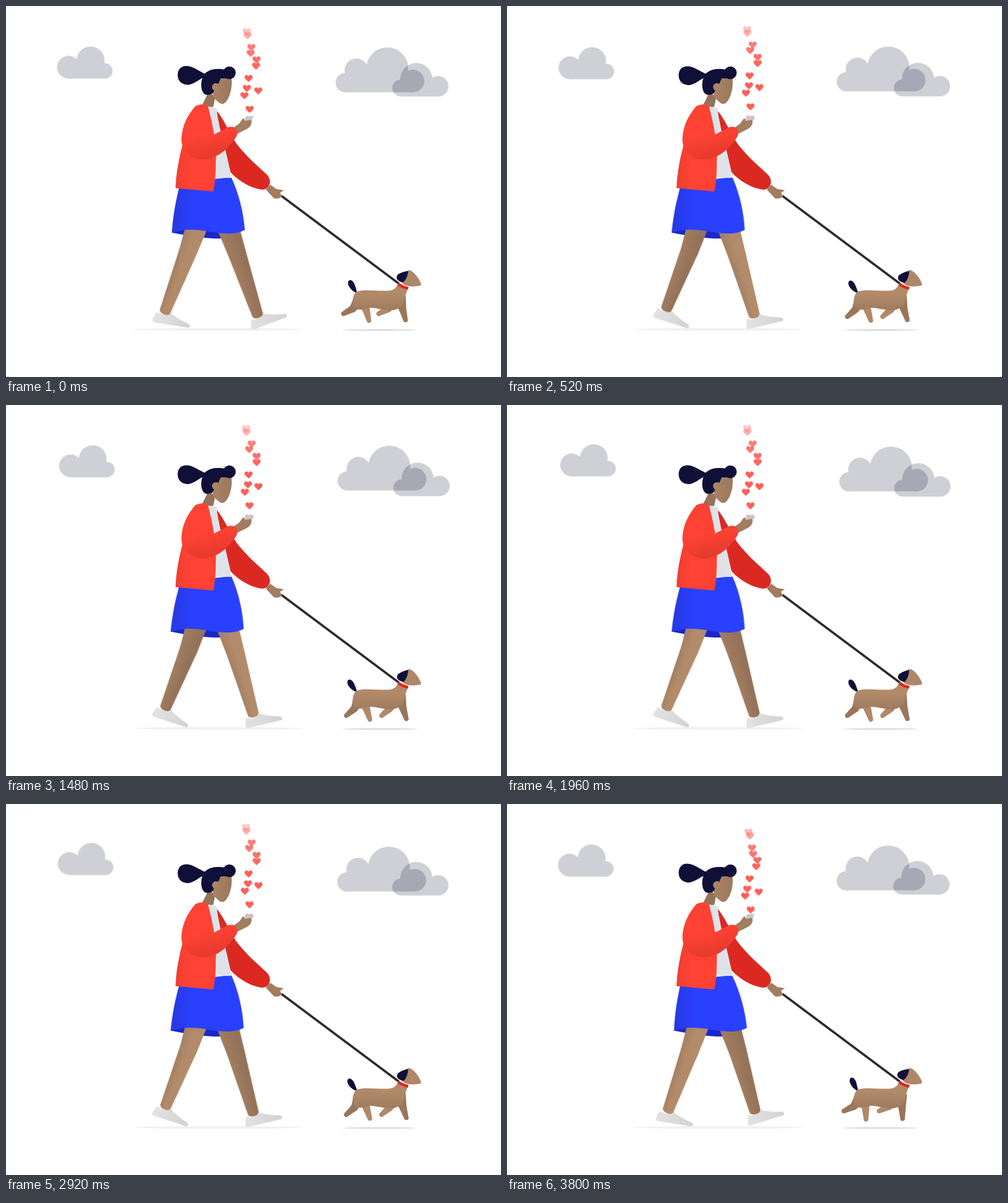
Animation of 800x600 px, one loop 3840 ms. Source, as an HTML page without scripts:

```html
<!DOCTYPE html>
<html lang="en">
<head>
<meta charset="utf-8">
<title>Walking the dog</title>
<style>
html, body { margin: 0; width: 100%; height: 100%; overflow: hidden; background: #fff; }
svg { display: block; width: 800px; height: 600px; }

/* Clouds drift on slow ellipses: x and y swing independently */
.cloud {
  fill: #0f0f36; opacity: .2;
  animation: drift 1920ms var(--dx) cubic-bezier(.37,0,.63,1) infinite alternate,
             float 1920ms var(--dy) cubic-bezier(.37,0,.63,1) infinite alternate;
}
@keyframes drift { from { translate: calc(var(--x) * -1) } to { translate: var(--x) } }
@keyframes float { from { transform: translateY(calc(var(--y) * -1)) } to { transform: translateY(var(--y)) } }

/* Each heart covers one stretch of its stream per step, then the next takes over */
.hearts use {
  --a: 1; --b: 1;
  fill: #ff5f57; offset-rotate: 0deg;
  animation: rise 480ms -440ms linear infinite, fade 480ms -440ms linear infinite;
}
.hearts .last { animation-name: rise, vanish; }
.hearts .late { animation-name: rise, vanish-late; }
@keyframes rise { from { offset-distance: 0% } to { offset-distance: 100% } }
@keyframes fade { from { opacity: var(--a) } to { opacity: var(--b) } }
@keyframes vanish { from { opacity: var(--a) } 24%, to { opacity: 0 } }
@keyframes vanish-late { from { opacity: var(--a) } 62%, to { opacity: 0 } }

/* Walk: 0% leg fully back, 50% fully forward */
.thigh, .shin, .foot { animation: 960ms var(--delay) linear infinite; }
.near { --delay: 0ms; fill: url(#nearSkin); }
.far { --delay: -480ms; fill: url(#farSkin); }
.thigh { animation-name: thigh; }
.shin { translate: 0 112px; animation-name: shin; }
.foot { translate: 0 104px; animation-name: foot; fill: url(#shoeGrey); }
@keyframes thigh {
  0%, 100% { translate: 330px 293px; rotate: 19deg }
  4.17% { translate: 330px 288px; rotate: 18deg }
  12.5% { translate: 331px 292px; rotate: 10deg }
  25% { translate: 334px 293px; rotate: -12deg }
  37.5% { translate: 337px 293px; rotate: -26deg }
  45.83% { translate: 338px 292px; rotate: -18deg }
  50% { translate: 338px 297px; rotate: -19deg }
  54.17% { translate: 338px 295px; rotate: -17.3deg }
  62.5% { translate: 336px 295px; rotate: -22deg }
  75% { translate: 334px 293px; rotate: -9deg }
  87.5% { translate: 331px 293px; rotate: 3.5deg }
  95.83% { translate: 330px 293px; rotate: 18deg }
}
@keyframes shin {
  0%, 100% { rotate: 2deg }
  4.17% { rotate: 3.5deg }
  12.5% { rotate: 30deg }
  25% { rotate: 52deg }
  37.5% { rotate: 34deg }
  45.83% { rotate: 2deg }
  50% { rotate: .5deg }
  54.17% { rotate: 1deg }
  62.5% { rotate: 24deg }
  75% { rotate: 22deg }
  87.5% { rotate: 16deg }
  95.83% { rotate: 2deg }
}
@keyframes foot {
  0%, 100% { rotate: -12deg }
  4.17% { rotate: -4deg }
  12.5% { rotate: 0deg }
  25% { rotate: -8deg }
  37.5% { rotate: -12deg }
  45.83% { rotate: -1deg }
  50% { rotate: -2.5deg }
  54.17% { rotate: 2.5deg }
  62.5% { rotate: -2deg }
  75% { rotate: -13deg }
  87.5% { rotate: -19.5deg }
  95.83% { rotate: -11deg }
}

/* Secondary motion, one swing back and forth per step */
.skirt, .pony, .tail, .ear, .upper, .lower {
  animation: 240ms -120ms cubic-bezier(.37,0,.63,1) infinite alternate;
}
.skirt { transform-origin: 320px 290px; animation-name: sway; }
@keyframes sway { from { transform: skewX(2.8deg) } to { transform: skewX(-2.8deg) } }
.pony { transform-origin: 322px 112px; animation-name: swing; --from: 2deg; --to: -2deg; }
.tail { transform-origin: 567px 463px; animation-name: swing; --from: 6deg; --to: -10deg; }
.ear { transform-origin: 650px 430px; animation-name: swing; --from: 7deg; --to: -7deg; }
@keyframes swing { from { rotate: var(--from) } to { rotate: var(--to) } }

/* Dog trots with diagonal legs in pairs */
.upper { --from: 35deg; --to: -18deg; animation-name: swing; animation-delay: var(--delay); }
.lower { --from: 30deg; --to: 0deg; translate: 0 18px; animation-name: swing; animation-delay: var(--delay); }
.pair-a { --delay: -30ms; }
.pair-b { --delay: -210ms; }
</style>
</head>
<body>
<svg viewBox="0 0 800 600" xmlns="http://www.w3.org/2000/svg">
  <defs>
    <linearGradient id="nearSkin"><stop stop-color="#a17c5f"/><stop offset=".5" stop-color="#b28b6b"/></linearGradient>
    <linearGradient id="farSkin"><stop stop-color="#a37e61"/><stop offset=".7" stop-color="#95735a"/></linearGradient>
    <linearGradient id="shoeGrey"><stop stop-color="#e3e3e3"/><stop offset="1" stop-color="#d2d2d2"/></linearGradient>
    <linearGradient id="face"><stop stop-color="#a98465"/><stop offset="1" stop-color="#9b785c"/></linearGradient>
    <linearGradient id="fur" x2="0" y2="1"><stop offset=".4" stop-color="#b18a6a"/><stop offset="1" stop-color="#9f7b5e"/></linearGradient>
    <linearGradient id="sleeve" x2=".25" y2="1"><stop offset=".6" stop-color="#ff4233"/><stop offset="1" stop-color="#e63b2e"/></linearGradient>
    <linearGradient id="jacket"><stop stop-color="#ee3e30"/><stop offset=".35" stop-color="#ff4233"/></linearGradient>
    <linearGradient id="cloth"><stop stop-color="#2538e0"/><stop offset=".3" stop-color="#2a40ff"/></linearGradient>
    <path id="heart" d="M0 6L-5.5 .7C-9-3.5-3-8.5 0-3.4C3-8.5 9-3.5 5.5 .7Z"/>
    <path id="thigh" d="M-22 0L-14.5 112A14.5 14.5 0 0 0 14.5 112L22 0Z"/>
    <path id="calf" d="M-14.5 0L-9 102Q-8 107 0 107T9 102L14.5 0Z"/>
    <path id="shoe" d="M-13 1L-17 13Q-18 18-13 18H42Q46 17 42 12C32 9 20 6 10-1Q-2 7-13 1Z"/>
    <path id="haunch" d="M-10-2L-6 18A6 6 0 0 0 6 18L11-2Z"/>
    <path id="paw" d="M-6 0L-3.5 20Q0 24 3.5 20L6 0Z"/>
    <clipPath id="abovePhone"><path d="M0 0H800V184H0Z"/></clipPath>
  </defs>

  <g class="cloud" style="--x:1.8px;--y:2px;--dx:-120ms;--dy:-1270ms">
    <circle cx="102.7" cy="98" r="18.5"/><circle cx="138.5" cy="87" r="22.5"/><circle cx="161.5" cy="104" r="12.5"/>
    <path d="M102 85H150V104H161.500V116.500H102Z"/>
  </g>
  <g class="cloud" style="--x:2.3px;--y:2px;--dx:-3640ms;--dy:-2900ms">
    <circle cx="550.300" cy="124" r="15.500"/><circle cx="568.300" cy="104" r="19"/><circle cx="618.300" cy="101" r="34"/><circle cx="660" cy="121.300" r="18.200"/>
    <path d="M550 108H580L600 100H640V121H660V139.500H550Z"/>
  </g>
  <g class="cloud" style="--x:1.1px;--y:1.2px;--dx:-480ms;--dy:-3410ms">
    <circle cx="638.500" cy="133.500" r="13.500"/><circle cx="664" cy="119" r="26"/><circle cx="699.500" cy="130.700" r="16.500"/>
    <path d="M638.500 120H699V147.200H638.500Z"/>
  </g>

  <ellipse cx="343" cy="523" rx="137" ry="2.200" fill="#f1f1f1"/>
  <ellipse cx="604" cy="524" rx="61.500" ry="1.500" fill="#dfdfe1"/>

  <g class="hearts" clip-path="url(#abovePhone)">
    <use href="#heart" style="offset-path:path('M391 213C391 197 395 179 393.5 163')"/>
    <use href="#heart" style="offset-path:path('M393.5 163C392 147 392 129 392 113')"/>
    <use href="#heart" style="offset-path:path('M392 113C392 97 395 79 397 63');--b:.8"/>
    <use href="#heart" class="late" style="offset-path:path('M397 63C399 47 390 30 388 13');--a:.8"/>

    <use href="#heart" style="offset-path:path('M388 192C392 172 408 152 408 132')"/>
    <use href="#heart" style="offset-path:path('M408 132C408 112 403 90 393 72');--b:.85"/>
    <use href="#heart" class="late" style="offset-path:path('M393 72C383 54 384 30 384 12');--a:.85"/>

    <use href="#heart" style="offset-path:path('M393 183C393 165 383 144 391 129')"/>
    <use href="#heart" style="offset-path:path('M391 129C399 114 405 99 405 83');--b:.9"/>
    <use href="#heart" style="offset-path:path('M405 83C405 67 391 53 388 38');--a:.9;--b:.35"/>
    <use href="#heart" class="last" style="offset-path:path('M388 38C385 23 384 8 384 -8');--a:.35"/>

    <use href="#heart" style="offset-path:path('M389 189C389 173 382 157 386 141')"/>
    <use href="#heart" style="offset-path:path('M386 141C390 125 402 109 405 93');--b:.95"/>
    <use href="#heart" style="offset-path:path('M405 93C408 77 396 60 388.5 44');--a:.95;--b:.5"/>
    <use href="#heart" class="last" style="offset-path:path('M388.5 44C382 28 384 12 384 0');--a:.5"/>
  </g>

  <!-- Woman -->
  <path class="skirt" fill="#1a27c9" d="M268 366.500Q320 377 350 376L385 362L290 350Z"/>
  <g class="far"><g class="thigh">
    <g class="shin"><use class="foot" href="#shoe"/><use href="#calf"/></g>
    <use href="#thigh"/>
  </g></g>
  <g class="near"><g class="thigh">
    <g class="shin"><use class="foot" href="#shoe"/><use href="#calf"/></g>
    <use href="#thigh"/>
  </g></g>
  <path class="skirt" fill="url(#cloth)" d="M282 285L364 277C377 305 384 335 386 362C372 370 352 369 330 365Q305 361 290 362L268 366.500C270 340 274 315 282 285Z"/>

  <path fill="#db2922" d="M340 169C350 180 360 202 372 222C388 243 407 259 422 273C431 283 426 297 414 297C396 295 376 283 363 269L350 220Z"/>
  <path fill="#dfe3e9" d="M325 160L341 166C340 190 357 230 364 278H332Z"/>
  <path fill="#95725a" d="M328 138L317 160Q326 164 335 163L338 148Z"/>
  <path fill="url(#jacket)" d="M306 162Q316 157 326 161C334 190 341 225 339 255Q339 282 335 300L274 294.500C275 268 280 245 286 222Z"/>

  <path d="M445 307L635 449" stroke="#2c2c2e" stroke-width="3.600"/>
  <path fill="#a27d60" d="M427 289L437 296L449 298L443 302L446 308Q440 313 433 311L420 297Z"/>
  <path fill="#c6c7cf" d="M388 178H400L396 188H384Z"/>
  <path fill="#a27d60" d="M366 198L377 190L382 183Q385 180 386 186L396 184C399 191 394 197 387 200L373 207Z"/>
  <path fill="url(#sleeve)" d="M306 162Q316 157 326 161L336 208L359 196C370 193 376 200 373 210C362 228 345 245 323 248C300 250 283 236 283.500 214C285 192 294 176 306 162Z"/>

  <path fill="url(#face)" d="M340 114L364 114C367 132 361 150 354 156.500Q350 160 345 157L335 148L332 128Z"/>
  <path fill="#0f0f38" d="M354 103C340 100 326 103 320 111C312 124 315 146 327 143.500C333 143 336 140 336 136A6 6 0 1 1 343 126L347 117H364Z"/>
  <circle cx="339" cy="131" r="6" fill="#a98465"/>
  <circle cx="361" cy="108" r="10.300" fill="#0f0f38"/>
  <path class="pony" fill="#0f0f38" d="M322 110C311 105 302 97 291 97C281 97 277 105 277.500 113C278 123 287 129 297 127C308 124 313 117 322 115Z"/>

  <!-- Dog -->
  <path class="tail" fill="#0f0f38" d="M568 465C557 460 551 450 554 444.500C558 440 563 446 564.500 452Z"/>
  <g fill="#997659">
    <g class="pair-a" transform="translate(571 474)"><g class="upper"><use class="lower" href="#paw"/><use href="#haunch"/></g></g>
    <g class="pair-b" transform="translate(636 473)"><g class="upper"><use class="lower" href="#paw"/><use href="#haunch"/></g></g>
  </g>
  <g fill="#b08969">
    <g class="pair-b" transform="translate(577 474)"><g class="upper"><use class="lower" href="#paw"/><use href="#haunch"/></g></g>
    <g class="pair-a" transform="translate(628 474)"><g class="upper"><use class="lower" href="#paw"/><use href="#haunch"/></g></g>
  </g>
  <path fill="url(#fur)" d="M566 462C580 457 605 462 622 460C630 458 632 453 634 448L650 456C646 465 645 470 643 478C641 488 630 493 618 492C605 491 598 488 588 488C578 491 566 493 562 487C559 480 560 468 566 462Z"/>
  <path fill="#ae8768" d="M652 427C660 430 668 441 671 450Q671 453 664 453C655 454 647 454 641 449L637 442C640 433 646 428 652 427Z"/>
  <path class="ear" fill="#0f0f38" d="M650 429Q641 429 633 434.500Q629 440 634 444Q638 447 642 447Q649 440 650 429Z"/>
  <path d="M634 449.500Q641 455 650 456.500" fill="none" stroke="#e0261f" stroke-width="4.600"/>
</svg>
</body>
</html>
```
